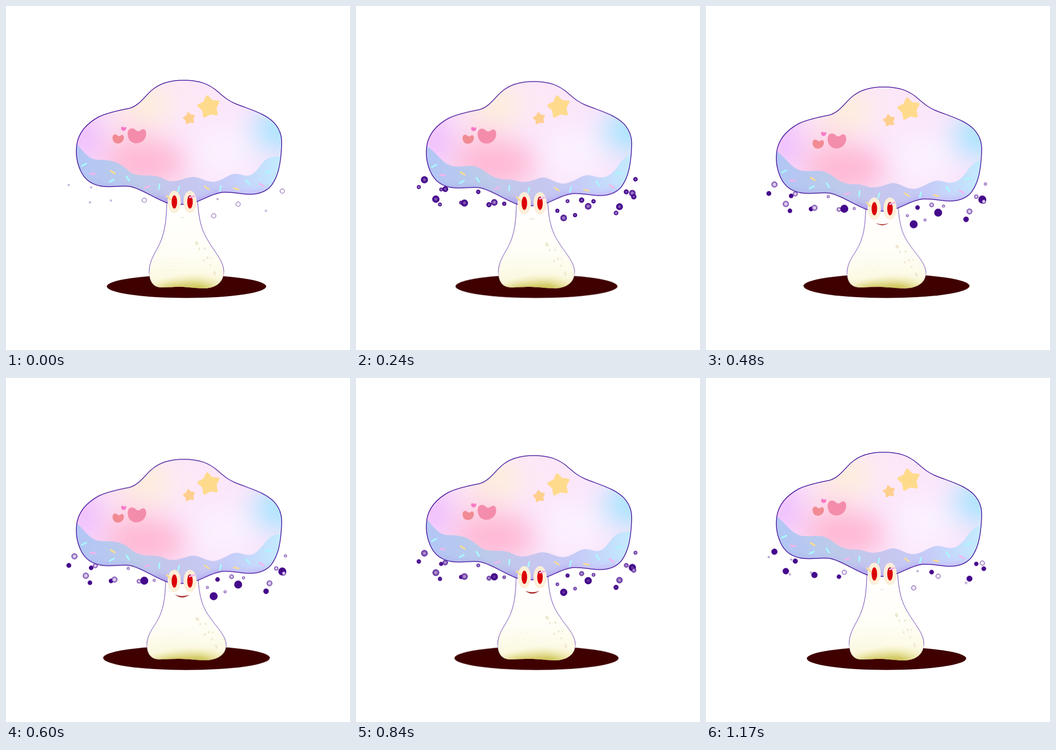
An HTML page without scripts for the animation above (1200 ms loop, 709 by 709 pixels).

```html
<!DOCTYPE html>
<html lang="en">
<head>
<meta charset="utf-8">
<title>Dreamy mushroom</title>
<style>
html, body { margin: 0; width: 100%; height: 100%; overflow: hidden; background: #fff; }
svg { display: block; width: 100vw; height: 100vh; }

.shadow, .stem, .cap, .hearts, .stars, .mouth, .frosting, .rise, .rise circle, .fall, .fall circle,
.pale1, .pale2, .full1, .full2, .full3 {
  animation: 1.2s linear infinite;
}
.shadow { animation-name: shadow; transform-origin: 372px 601px; }
.stem { animation-name: squash; transform-origin: 372px 580px; }
.shadow, .stem { animation-timing-function: cubic-bezier(.37, 0, .63, 1); }
@keyframes shadow { 50% { transform: scale(1.046); } }
@keyframes squash { 50% { transform: scale(1.062, .915); } }

.cap { animation-name: bob; animation-timing-function: cubic-bezier(.37, 0, .63, 1); }
@keyframes bob {
  0%, 10% { transform: none; }
  46% { transform: translateY(14.8px); }
  92%, 100% { transform: none; }
}
.hearts { animation-name: hearts; }
@keyframes hearts {
  0%, 12% { transform: none; }
  20% { transform: translateY(.5px); }
  30% { transform: translateY(2.8px); }
  40% { transform: translateY(10.5px); }
  46% { transform: translateY(13.8px); }
  52% { transform: translateY(15px); }
  60% { transform: translateY(14px); }
  80% { transform: translateY(4.6px); }
  90% { transform: translateY(1.4px); }
  100% { transform: none; }
}
.stars { animation-name: stars; }
@keyframes stars {
  0%, 20% { transform: none; }
  30% { transform: translateY(1px); }
  40% { transform: translateY(4.3px); }
  54% { transform: translateY(12.5px); }
  61% { transform: translateY(14.6px); }
  68% { transform: translateY(13px); }
  80% { transform: translateY(8px); }
  100% { transform: translateY(1.4px); }
}
.mouth { animation-name: smile; }
@keyframes smile {
  0%, 6%, 97%, 100% { d: path("M-5 0Q0 0 5 0Q0 1.4 -5 0Z"); fill: #d0a8a0; }
  20% { d: path("M-7 0Q0 .6 7 0Q0 2.2 -7 0Z"); fill: #d4988f; }
  30% { d: path("M-9 -1Q0 2 9 -1Q0 4 -9 -1Z"); fill: #b85048; }
  40% { d: path("M-13 -2Q0 3 13 -2Q0 6.6 -13 -2Z"); fill: #a01818; }
  60% { d: path("M-17 -5Q0 2 17 -5Q0 9 -17 -5Z"); fill: #a01212; }
  80% { d: path("M-12 -2Q0 2 12 -2Q0 6 -12 -2Z"); fill: #a81c1c; }
}
.frosting { animation-name: ripple; }
@keyframes ripple {
  0%, 60%, 80%, 100% { d: path("M140 276C158 298 168 317 192 317S232 321 252 339S300 343 322 355S356 358 378 353S415 369 438 360S464 341 486 348S515 340 528 324S550 312 574 309V420H140Z"); }
  20%, 36%, 97% { d: path("M140 284C163 291 176 326 204 328S240 319 268 340S310 351 328 357S358 359 378 352S412 369 436 362S468 341 490 348S525 348 540 327S560 306 574 298V420H140Z"); }
}

/* Bubbles: one set turns pale as it sinks, the other fills up */
.rise circle, .fall circle { transform-box: fill-box; transform-origin: center; stroke: #43008a; }
.rise { --k: .87; --m: .82; animation-name: riseMove; }
.rise .small { --k: 0; --m: .65; }
.rise circle { fill: url(#pale); stroke-width: .7; animation-name: riseSize; }
.fall { --k: .61; animation-name: fallMove; }
.fall .small { --k: .4; }
.fall circle { fill: url(#full); stroke-width: 1.4; animation-name: fallSize; }
@keyframes riseMove {
  0% { opacity: 0; transform: none; }
  2.4% { opacity: 0; }
  2.5% { opacity: 1; }
  20% { transform: none; }
  30% { transform: translateY(5px); }
  40% { transform: translateY(9.8px); }
  46% { transform: translateY(10.8px); }
  60% { transform: translateY(6.3px); }
  80%, 100% { opacity: 1; transform: none; }
}
@keyframes riseSize {
  0%, 4%, 96%, 100% { transform: scale(var(--k)); }
  20%, 80% { transform: scale(1); }
  30% { transform: scale(.93); }
  40%, 60% { transform: scale(var(--m)); }
}
@keyframes fallMove {
  0%, 6% { transform: none; }
  20% { transform: translateY(4.2px); }
  30% { transform: translateY(11px); }
  40% { transform: translateY(17.4px); }
  46% { transform: translateY(18.6px); }
  60% { transform: translateY(14px); }
  80% { transform: translateY(4.4px); }
  94%, 100% { transform: none; }
}
@keyframes fallSize {
  0%, 98%, 100% { transform: scale(var(--k)); }
  20%, 80% { transform: scale(.82); }
  30% { transform: scale(.95); }
  40%, 60% { transform: scale(1); }
}
.pale1 { animation-name: pale1; }
.pale2 { animation-name: pale2; }
.full1 { animation-name: full1; }
.full2 { animation-name: full2; }
.full3 { animation-name: full3; }
@keyframes pale1 {
  0%, 5%, 97%, 100% { stop-color: #43008a; }
  20%, 80% { stop-color: #9a7bc8; }
  30% { stop-color: #b59bd8; }
  40%, 60% { stop-color: #f3ecfb; }
}
@keyframes pale2 {
  0%, 20%, 80%, 100% { stop-color: #450d8c; }
  30% { stop-color: #65389f; }
  40%, 60% { stop-color: #c3aee0; }
}
@keyframes full1 {
  0%, 100% { stop-color: #fff; }
  20%, 80% { stop-color: #baa6dc; }
  30% { stop-color: #8a68bc; }
  40%, 60% { stop-color: #43008a; }
}
@keyframes full2 {
  0%, 100% { stop-color: #fff; }
  20%, 80% { stop-color: #8058b4; }
  30%, 70% { stop-color: #43108a; }
}
@keyframes full3 {
  0%, 100% { stop-color: #fff; }
  15%, 85% { stop-color: #43008a; }
}
</style>
</head>
<body>
<svg viewBox="0 0 709 709">
  <defs>
    <path id="capShape" d="M366 153C398 153 418 160 437 177C452 190 460 196 472 201C510 216 534 222 552 240C568 257 569 275 568 290C566 330 560 352 547 370C535 384 518 389 498 388C476 386 462 383 446 384C422 387 405 401 385 406C372 410 345 410 330 405C305 396 280 377 256 372C240 369 220 374 202 372C178 370 162 359 153 338C146 322 143 305 146 285C150 260 166 242 192 228C215 218 235 215 254 211C275 205 285 187 300 174C318 158 340 153 366 153Z"/>
    <path id="stemShape" d="M332 385C331 430 330 455 320 482C311 506 295 521 295 549C296 568 303 579 319 580C340 580 350 578 365 579C385 580 393 582 410 582C434 581 449 568 449 547C448 525 430 507 418 486C403 463 396 440 394 385Z"/>
    <path id="heart" d="M-19 -2C-20 -16 -8 -18 -1 -10Q3 -7 8 -11C15 -16 20 -11 19 -1C17 10 8 16 -2 16C-12 15 -18 9 -19 -2Z"/>
    <polygon id="star" stroke-width="6" stroke-linejoin="round" transform="rotate(-10) scale(1.04)"
      points="0,-20 7,-9.7 19,-6.2 11.4,3.7 11.8,16.2 0,12 -11.8,16.2 -11.4,3.7 -19,-6.2 -7,-9.7"/>
    <path id="bit" d="M-5 0H5"/>
    <clipPath id="capClip"><use href="#capShape"/></clipPath>
    <clipPath id="stemClip"><use href="#stemShape"/></clipPath>
    <filter id="soft" x="-30%" y="-30%" width="160%" height="160%"><feGaussianBlur stdDeviation="28"/></filter>
    <filter id="glow" x="-30%" y="-60%" width="160%" height="220%"><feGaussianBlur stdDeviation="9"/></filter>
    <linearGradient id="icing" gradientUnits="userSpaceOnUse" x1="145" x2="568" y1="0" y2="0">
      <stop stop-color="#b2c6f6"/>
      <stop offset=".28" stop-color="#bccbea"/>
      <stop offset=".5" stop-color="#c6c6ee"/>
      <stop offset=".75" stop-color="#c6cdf8"/>
      <stop offset="1" stop-color="#c4ecff"/>
    </linearGradient>
    <linearGradient id="stemFill" gradientUnits="userSpaceOnUse" x1="0" x2="0" y1="400" y2="580">
      <stop stop-color="#fff"/>
      <stop offset=".6" stop-color="#fffef6"/>
      <stop offset="1" stop-color="#fbf8dc"/>
    </linearGradient>
    <linearGradient id="stemLine" gradientUnits="userSpaceOnUse" x1="0" x2="0" y1="545" y2="560">
      <stop stop-color="#4a12a0"/>
      <stop offset="1" stop-color="#4a12a0" stop-opacity="0"/>
    </linearGradient>
    <radialGradient id="olive">
      <stop stop-color="#bdb02c"/>
      <stop offset=".35" stop-color="#cfc658" stop-opacity=".8"/>
      <stop offset="1" stop-color="#f4efb8" stop-opacity="0"/>
    </radialGradient>
    <radialGradient id="pale">
      <stop class="pale1"/>
      <stop class="pale2" offset=".65"/>
      <stop offset="1" stop-color="#43008a"/>
    </radialGradient>
    <radialGradient id="full">
      <stop class="full1"/>
      <stop class="full2" offset=".5"/>
      <stop class="full3" offset="1"/>
    </radialGradient>
  </defs>

  <ellipse class="shadow" cx="372" cy="578" rx="164.3" ry="23.7" fill="#3f0000"/>

  <g class="fall">
    <circle cx="285" cy="400.5" r="7.5"/>
    <circle cx="428" cy="432.5" r="7.5"/>
    <circle cx="478.5" cy="408.5" r="7.5"/>
    <circle cx="569.5" cy="381.5" r="7.5"/>
    <g class="small">
      <circle cx="129.5" cy="369" r="4.3"/>
      <circle cx="175.5" cy="374" r="4"/>
      <circle cx="173" cy="404.8" r="4"/>
      <circle cx="216.5" cy="401" r="4"/>
      <circle cx="436" cy="398" r="4"/>
      <circle cx="536" cy="422.3" r="5"/>
    </g>
  </g>
  <g class="rise">
    <circle cx="141" cy="358" r="7"/>
    <circle cx="164.5" cy="398" r="7.2"/>
    <circle cx="184" cy="377.3" r="5.7"/>
    <circle cx="223.5" cy="406" r="7"/>
    <circle cx="274" cy="409.5" r="5"/>
    <circle cx="465" cy="400" r="5.2"/>
    <circle cx="543" cy="413.5" r="6.7"/>
    <circle cx="557" cy="383" r="4.8"/>
    <circle cx="572.5" cy="393" r="5.2"/>
    <g class="small">
      <circle cx="252" cy="383" r="4.2"/>
      <circle cx="305.5" cy="407.5" r="4"/>
      <circle cx="415" cy="422" r="4"/>
      <circle cx="451.5" cy="431" r="4"/>
      <circle cx="489.5" cy="402.5" r="4.2"/>
      <circle cx="576" cy="357" r="4.3"/>
    </g>
  </g>

  <g class="stem">
    <use href="#stemShape" fill="url(#stemFill)"/>
    <g clip-path="url(#stemClip)">
      <ellipse cx="385" cy="587" rx="90" ry="38" fill="url(#olive)"/>
      <ellipse cx="340" cy="585" rx="60" ry="26" fill="url(#olive)" opacity=".55"/>
    </g>
    <use href="#stemShape" fill="none" stroke="url(#stemLine)" stroke-width=".9"/>
    <g fill="#efe8cf">
      <ellipse cx="393" cy="489" rx="3" ry="4.5" transform="rotate(-25 393 489)"/>
      <ellipse cx="398.5" cy="500.5" rx="1.7" ry="3"/>
      <ellipse cx="409.5" cy="500" rx="2" ry="2.6"/>
      <ellipse cx="415.5" cy="519" rx="2" ry="2.8"/>
      <ellipse cx="407.5" cy="524" rx="2" ry="2.4"/>
      <ellipse cx="423" cy="519" rx="1.2" ry="2.4"/>
      <ellipse cx="421" cy="534" rx="1.7" ry="2.4"/>
      <ellipse cx="430" cy="551" rx="2" ry="5" transform="rotate(-15 430 551)"/>
    </g>
    <path d="M333 524L362 520M330 531L366 528M318 541L352 536M316 548L338 543M340 545L372 540" fill="none" stroke="#f1ecd4" stroke-width="1.3" stroke-dasharray="1.4 5 2 3 1 7"/>
  </g>

  <g class="cap">
    <g clip-path="url(#capClip)">
      <use href="#capShape" fill="#fbe6fb"/>
      <g filter="url(#soft)">
        <ellipse cx="295" cy="200" rx="58" ry="42" fill="#fef0d8"/>
        <ellipse cx="385" cy="190" rx="60" ry="36" fill="#fde8f6"/>
        <ellipse cx="155" cy="270" rx="42" ry="55" fill="#eebcff"/>
        <ellipse cx="250" cy="255" rx="50" ry="30" fill="#fddcea"/>
        <ellipse cx="285" cy="322" rx="88" ry="46" fill="#ffb6d3"/>
        <ellipse cx="450" cy="300" rx="70" ry="50" fill="#fbf2ff"/>
        <ellipse cx="565" cy="256" rx="58" ry="44" fill="#a4e4ff"/>
        <ellipse cx="540" cy="330" rx="40" ry="18" fill="#f6e2fb"/>
      </g>
      <path class="frosting" fill="url(#icing)"/>
      <g filter="url(#glow)" fill="none" stroke-width="12">
        <path d="M305 400Q340 416 366 415Q410 410 446 391" stroke="#9a78f2"/>
        <path d="M446 393Q500 400 545 382" stroke="#c9a4f8"/>
        <path d="M160 371Q200 385 256 381L310 408" stroke="#a9a4f2"/>
      </g>
    </g>
    <use href="#capShape" fill="none" stroke="#3f0c98" stroke-width="1.5"/>

    <g fill="#fcefd9">
      <ellipse cx="346.8" cy="403.8" rx="13.6" ry="23"/>
      <ellipse cx="379.3" cy="403.8" rx="13.6" ry="23"/>
    </g>
    <g fill="#dc0008">
      <ellipse cx="347" cy="403.8" rx="5.7" ry="13.6"/>
      <ellipse cx="379.2" cy="403.8" rx="5.7" ry="13.6"/>
    </g>
    <path d="M375.5 394L381 391.5" stroke="#7a0818" stroke-width="2"/>
    <g transform="translate(363.3 435.6)"><path class="mouth"/></g>

    <g fill="none" stroke-width="3.4" stroke-linecap="round">
      <g stroke="#a9f8fc">
        <use href="#bit" transform="translate(161 327) rotate(-28)"/>
        <use href="#bit" transform="translate(218 360) rotate(-28)"/>
        <use href="#bit" transform="translate(251 355.5) rotate(58)"/>
        <use href="#bit" transform="translate(316 372.5) rotate(-85)"/>
        <use href="#bit" transform="translate(356 377) rotate(-75)"/>
        <use href="#bit" transform="translate(442 375.5) rotate(-75)"/>
        <use href="#bit" transform="translate(498 363) rotate(55)"/>
        <use href="#bit" transform="translate(540 342) rotate(-15)"/>
      </g>
      <g stroke="#f6b4ec">
        <use href="#bit" transform="translate(178.5 346) rotate(5)"/>
        <use href="#bit" transform="translate(291 373) rotate(-20)"/>
        <use href="#bit" transform="translate(383.5 393) rotate(-15)"/>
        <use href="#bit" transform="translate(527 369) rotate(30)"/>
      </g>
      <g stroke="#fddc8e">
        <use href="#bit" transform="translate(220 342.5) rotate(30)"/>
        <use href="#bit" transform="translate(335 395) rotate(45)"/>
        <use href="#bit" transform="translate(414 375) rotate(37)"/>
        <use href="#bit" transform="translate(474.5 377) rotate(12)"/>
      </g>
    </g>
  </g>

  <g class="hearts">
    <use href="#heart" transform="translate(269.8 267)" fill="#f48cab"/>
    <use href="#heart" transform="translate(231.3 273.7) scale(.61)" fill="#f18a93"/>
    <use href="#heart" transform="translate(242.6 252.9) scale(.28)" fill="#f878c6"/>
  </g>
  <g class="stars">
    <use href="#star" transform="translate(418.3 208)" fill="#fedb8c" stroke="#fedb8c"/>
    <use href="#star" transform="translate(377.5 231.7) scale(.55)" fill="#ffcf8e" stroke="#ffcf8e"/>
  </g>
</svg>
</body>
</html>
```
